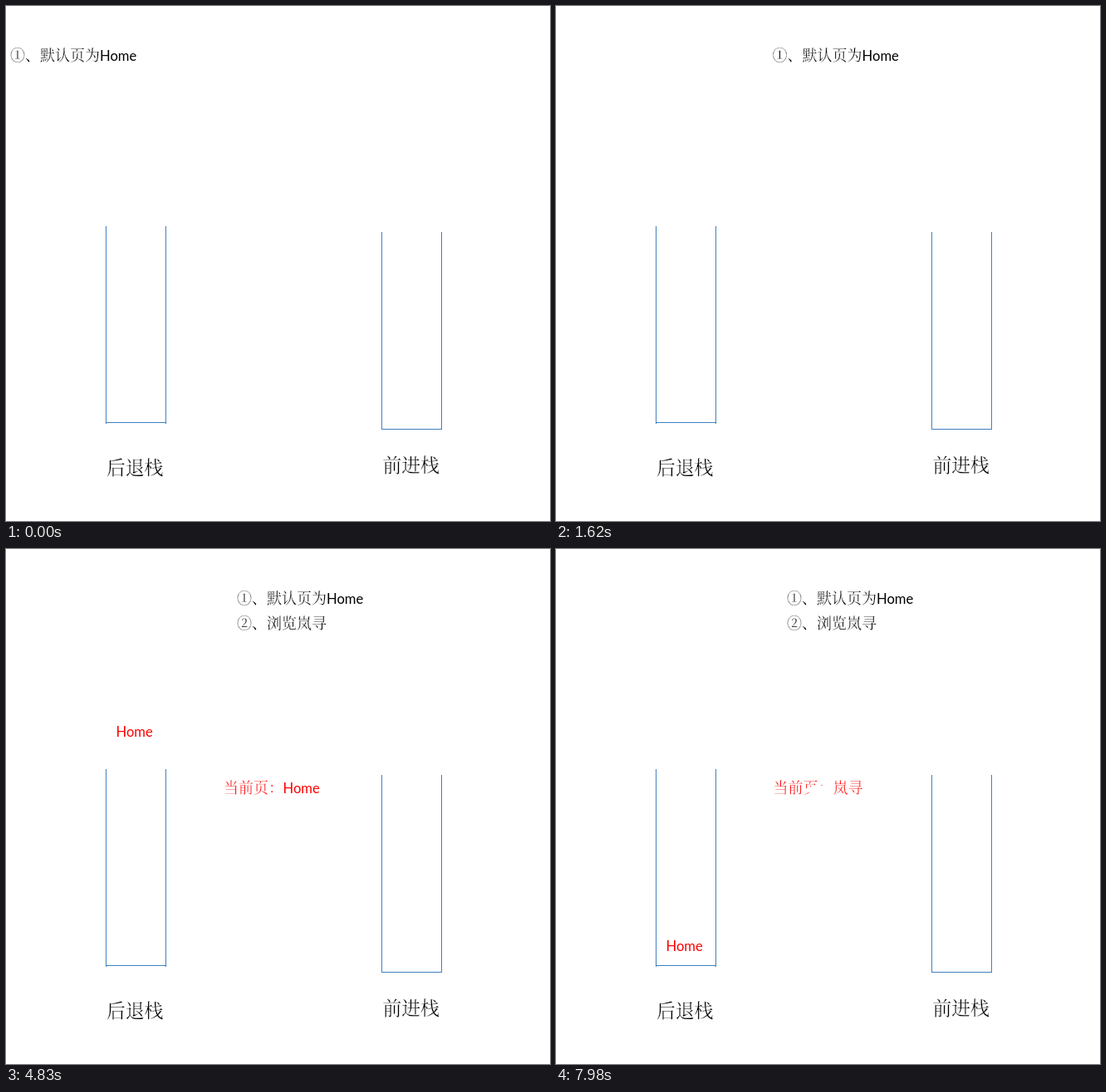
Animation, 655 px wide and 620 px high, one loop 8 s. Source, as an HTML page:

```html
<!DOCTYPE html>
<html lang="zh-CN">
<head>
<meta charset="utf-8">
<title>后退栈与前进栈</title>
<style>
  html, body { margin: 0; width: 100%; height: 100%; overflow: hidden; background: #fff; }
  svg { display: block; }
  /* the white outline thins the strokes */
  text {
    font: 300 18px "Noto Serif CJK SC", "Noto Sans CJK SC", "Noto Sans CJK", serif;
    white-space: pre; stroke: #fff; stroke-width: .25px;
  }
  .latin { font: 400 16.6px Lato, sans-serif; stroke: none; }
  .label { font-size: 22.8px; }
  .red { fill: #f00; }
  .stack { fill: none; stroke: #4080bf; shape-rendering: crispEdges; }
</style>
</head>
<body>
<svg width="655" height="620" viewBox="0 0 655 620">
  <text id="pageHome" class="red" x="262" y="294">当前页：<tspan class="latin" x="333.5">Home</tspan></text>
  <text id="pageNext" class="red" x="261.5" y="294">当前页：岚寻</text>
  <polygon id="hole" fill="#fff"/>

  <path class="stack" d="M120.5 265V503M192.5 265V503M120 501.5H193"/>
  <path class="stack" d="M452.5 272V510M524.5 272V510M452 509.5H525"/>
  <text class="label" x="121" y="563.5">后退栈</text>
  <text class="label" x="453.5" y="560.5">前进栈</text>

  <g id="stepOne">
    <text x="5" y="66">①、默认页为<tspan class="latin" x="113">Home</tspan></text>
  </g>
  <g id="stepTwo"><text y="96">②、浏览岚寻</text></g>
  <g id="pushed"><text class="red latin" x="132.5">Home</text></g>
</svg>
<script>
const LOOP = 8000, TICK = 78.2;
const HOLE_SPEED = 7.5;
const el = id => document.getElementById(id);

function show(node, visible) {
  node.setAttribute('visibility', visible ? 'visible' : 'hidden');
}

// Steady travel from one place to another, hidden before it starts
function travel(id, tick, { start, from, to, speed, axis }) {
  const node = el(id);
  const value = Math.min(to, from + speed * (tick - start));
  show(node, tick >= start);
  node.setAttribute('transform', axis === 'x' ? `translate(${value} 0)` : `translate(0 ${value})`);
}

// A diamond closes over the text until it is fully uncovered
function reveal(id, tick, { start, end, until = Infinity, cx }) {
  const visible = tick >= start && tick < until;
  show(el(id), visible);
  if (!visible) return;
  const cy = 290, w = HOLE_SPEED * Math.max(0, end - tick), h = w * 0.4;
  el('hole').setAttribute('points', `${cx - w},${cy} ${cx},${cy - h} ${cx + w},${cy} ${cx},${cy + h}`);
}

function draw(time) {
  const tick = Math.round(time / TICK);
  travel('stepOne', tick, { start: 0, from: 0, to: 273, speed: 12.17, axis: 'x' });
  reveal('pageHome', tick, { start: 30, end: 41, until: 82, cx: 320.5 });
  travel('stepTwo', tick, { start: 44, from: -44, to: 278, speed: 64.4, axis: 'x' });
  travel('pushed', tick, { start: 51, from: 4, to: 484, speed: 20.2, axis: 'y' });
  reveal('pageNext', tick, { start: 91, end: 104.4, cx: 315 });
}

const began = performance.now();
function loop() {
  draw((performance.now() - began) % LOOP);
  requestAnimationFrame(loop);
}
loop();
</script>
</body>
</html>
```
